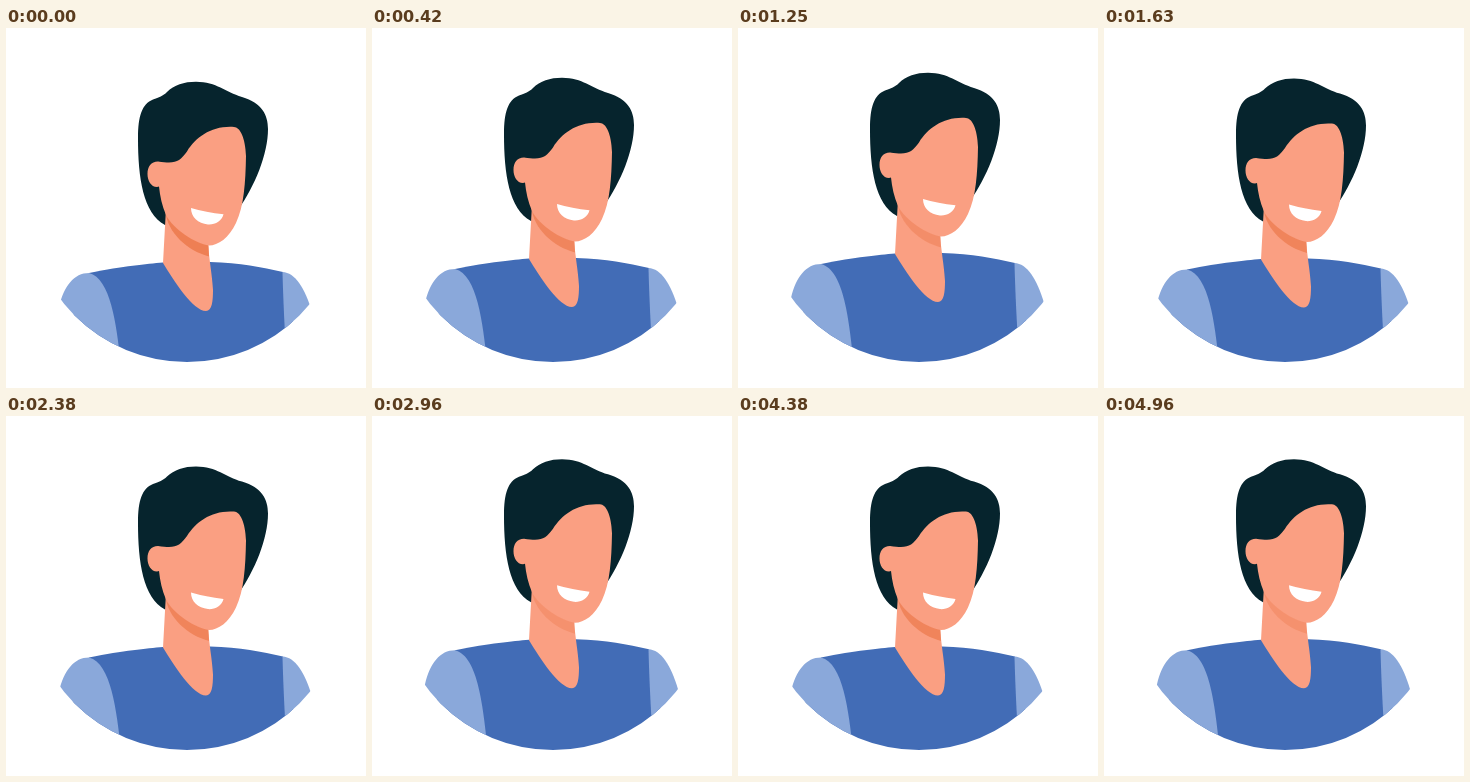
Write an HTML page with a canvas that moves like this. It is 360x360 px and loops after 5 s.

```html
<!DOCTYPE html>
<html lang="en">
<head>
<meta charset="utf-8">
<title>Breathing portrait</title>
<style>
  html, body { margin: 0; width: 100%; height: 100%; overflow: hidden; background: #fff; }
  canvas { display: block; width: 360px; height: 360px; }
</style>
</head>
<body>
<canvas id="stage" width="360" height="360"></canvas>
<script>
const ctx = document.getElementById('stage').getContext('2d');

const LOOP = 5000;
const HALF_BREATH = 24; // ticks, at 24 per second
const RISE = 10.7;

const SKIN = '#fa9f82', SHADE = '#ee7f54', HAIR = '#06242d';
const SHIRT = '#426cb6', SLEEVE = '#8aa8da';

const shape = (color, d) => ({ color, path: new Path2D(d) });

// All parts are drawn in the lowest pose.
const torso = [
  shape(SHIRT, 'M40 360 L83 245 C118 238 140 236 157 234.5 L204 234 C235 235 255 239 277 244 L300 360 Z'),
  shape(SLEEVE, 'M83 245 C68 245 58 258 53 279 L40 360 L118 360 C112 320 110 252 83 245 Z'),
  shape(SLEEVE, 'M276.5 244 C289 244.5 299 260 306 284 L320 360 L283 360 C279 320 277 265 276.5 244 Z'),
];
const hair = shape(HAIR, 'M159 197 C137 185 132 150 132 110 C132 88 136 76 147 71.5 C153 69.5 157 68 161 64 C168 57 178 53.8 190 53.8 C211 54 219 64 236 69 C256 75 262 87 262 101 C262 126 249 158 232 182 L200 200 Z');
const neck = shape(SKIN, 'M160 180 L157 235 C168 253 187 283 200 283 C206 283 207 273 207 262 C206 245 203 232 202 214 Z');
const shade = shape(SHADE, 'M159.5 183 C161 205 182 223 203 228.5 L202 210 Z');
const face = shape(SKIN, 'M152 133.5 C170 136 173 134 181 123.5 C190 109 206 97.5 228 99 C234 99 239.5 110 240 128 C239.5 155 238 178 230 195 C223 210 212 217.5 203 217.5 C190 216 167 201 160 187 C156 178 154 168 153 158.5 L151 159 C145 159 141.5 152.5 141.5 146 C141.5 138.5 145 133.5 152 133.5 Z');
const mouth = shape('#fff', 'M185 180 Q200 184.5 217.5 186.3 C216 193 209 197 202 196.5 C192 195.5 185 189 185 180 Z');

const frame = new Path2D();
frame.rect(0, 0, 360, 250);
frame.arc(181, 175, 159, 0, Math.PI);

function fill(part, alpha = 1) {
  ctx.globalAlpha = alpha;
  ctx.fillStyle = part.color;
  ctx.fill(part.path);
}

// Ticks fall on whole hundredths of a second.
function tickAt(ms) {
  const c = Math.floor((ms % LOOP) / 10);
  return Math.ceil((c + 0.5) * 0.24) - 1;
}

function breath(tick) {
  const u = (tick / HALF_BREATH) % 2;
  const x = u > 1 ? 2 - u : u;
  return x * x * (3 - 2 * x);
}

function draw(ms) {
  const lift = breath(tickAt(ms));
  ctx.globalAlpha = 1;
  ctx.fillStyle = '#fff';
  ctx.fillRect(0, 0, 360, 360);
  ctx.save();
  ctx.clip(frame);
  ctx.translate(0, -RISE * lift);
  torso.forEach(part => fill(part));
  fill(hair);
  fill(neck);
  fill(shade, 1 - 0.55 * lift);
  fill(face);
  fill(mouth);
  ctx.restore();
}

const start = performance.now();
function loop() {
  draw(performance.now() - start);
  requestAnimationFrame(loop);
}
loop();
</script>
</body>
</html>
```
